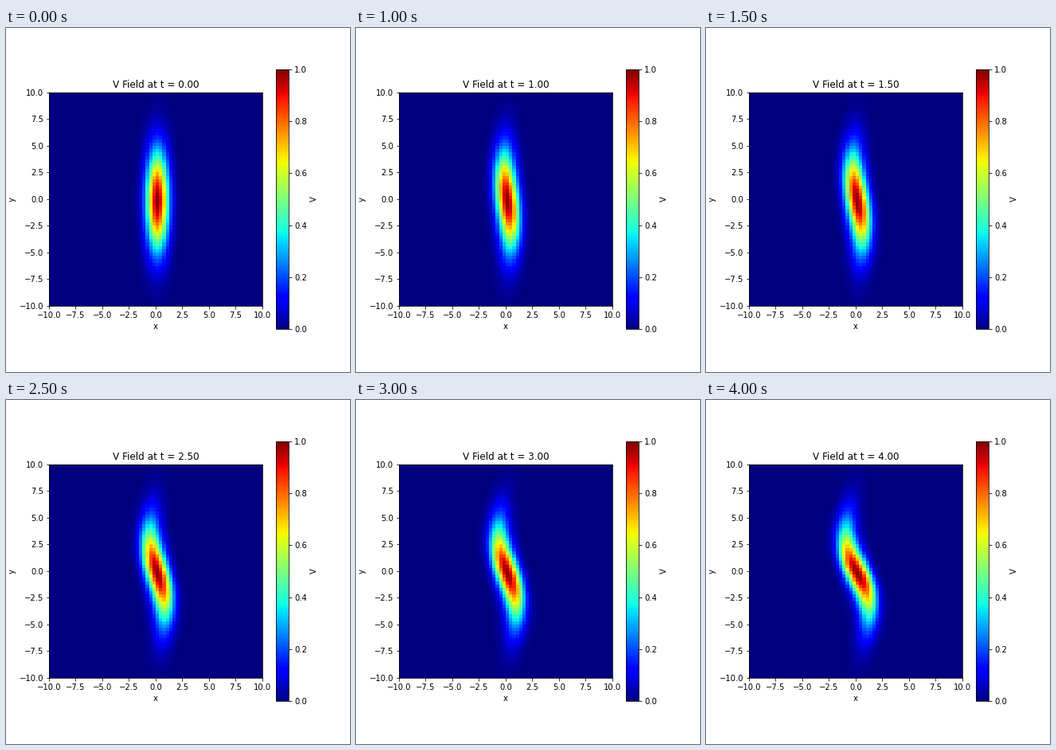
Write a matplotlib script that moves like this. It is 432x432 px and loops after 4.5 s.

```python
import numpy as np
import matplotlib.pyplot as plt
from matplotlib.animation import FuncAnimation

plt.rcParams.update({"font.family": "DejaVu Sans", "font.size": 10,
                     "figure.subplot.bottom": 0.125})

N, L, NU = 64, 20.0, 0.001
DT, STEPS = 0.05, 10          # ten steps between pictures
FRAMES, INTERVAL = 9, 500

h = L / N
axis = -L / 2 + h * np.arange(N)
X, Y = np.meshgrid(axis, axis)
k = 2 * np.pi * np.fft.fftfreq(N, h)
K2 = k[None, :] ** 2 + k[:, None] ** 2
K2[0, 0] = np.inf             # drops the mean of the stream function


def diff(a, ax):
    return (np.roll(a, -1, ax) - np.roll(a, 1, ax)) / (2 * h)


def laplacian(a):
    near = sum(np.roll(a, s, ax) for s in (-1, 1) for ax in (0, 1))
    return (near - 4 * a) / h ** 2


def rate(w):
    psi = np.fft.ifft2(-np.fft.fft2(w) / K2).real
    turn = diff(psi, 1) * diff(w, 0) - diff(psi, 0) * diff(w, 1)
    return turn + NU * laplacian(w)


def advance(w):
    for _ in range(STEPS):
        a = rate(w)
        b = rate(w + DT / 2 * a)
        c = rate(w + DT / 2 * b)
        d = rate(w + DT * c)
        w = w + DT / 6 * (a + 2 * b + 2 * c + d)
    return w


fields = [np.exp(-X ** 2 - Y ** 2 / 20)]
while len(fields) < FRAMES:
    fields.append(advance(fields[-1]))

fig, ax = plt.subplots(figsize=(6, 6), dpi=72)
img = ax.imshow(fields[0], extent=(-10, 10, -10, 10), cmap="jet",
                vmin=0, vmax=1, interpolation="nearest")
fig.colorbar(img, ax=ax, label="V")
ax.set_xlabel("x")
ax.set_ylabel("y")
title = ax.set_title("")


def draw(i):
    img.set_data(fields[i])
    title.set_text(f"V Field at t = {i * 0.5:.2f}")
    return img, title


anim = FuncAnimation(fig, draw, frames=FRAMES, interval=INTERVAL,
                     repeat=True, repeat_delay=0, blit=False)
plt.show()
```
